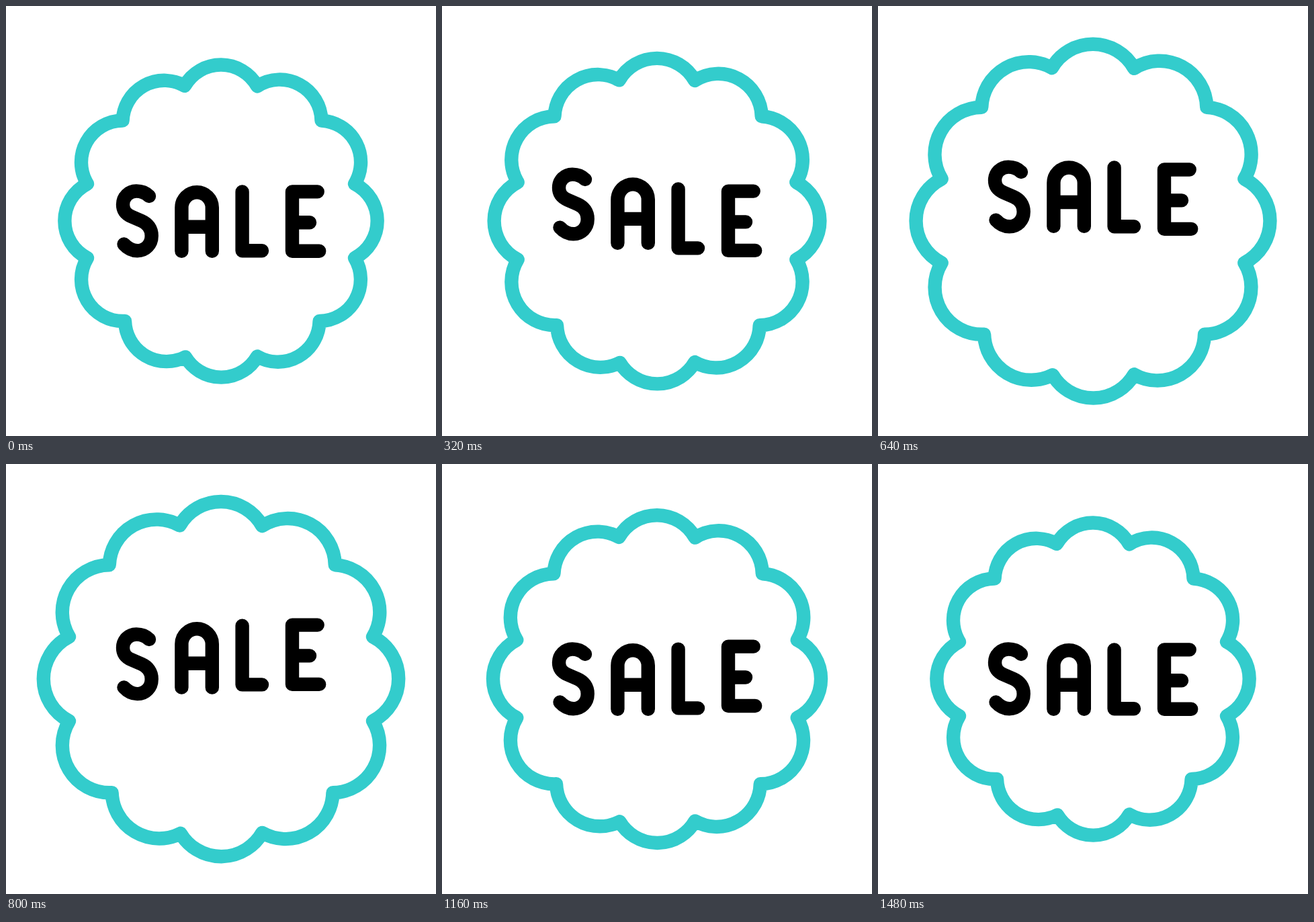
Recreate the animation shown at these times as an HTML page. Size 640 by 640 pixels, loop 1.64 s.

```html
<!DOCTYPE html>
<html lang="en">
<head>
<meta charset="utf-8">
<title>Sale badge</title>
<style>
  html, body { margin: 0; width: 100%; height: 100%; overflow: hidden; background: #fff; }
  svg { display: block; width: 100vw; height: 100vh; }
  path { fill: none; stroke-width: 20.4; stroke-linecap: round; stroke-linejoin: round; }
  #badge { stroke: #3cc; }
  #word path { stroke: #000; }
</style>
</head>
<body>
<svg viewBox="0 0 640 640" role="img" aria-label="SALE">
  <path id="badge"/>
  <g id="word">
    <path d="M213 283C209 279 203 275.5 194 275.5C183 275.5 174 284 174 295.5C174 305 179 310 187 313.5L202 320C211 324 216.7 331.5 216.7 342C216.7 355 207.5 364.2 195.5 364.2C187 364.2 181 360.5 175.5 354.5"/>
    <path d="M261.4 364.7V300A22.7 22.7 0 0 1 306.8 300V364.7M261.4 328.8H306.8"/>
    <path d="M351.6 276.5V364.3H381"/>
    <path d="M463.7 276.4H426V364.7H466.2M426 322.2H452"/>
  </g>
</svg>
<script>
  const LOOP = 1640, TICK = 40;
  const LIFT = 36.8, STAGGER = 80, GROWTH = 0.136;

  const badge = document.getElementById('badge');
  const letters = [...document.querySelectorAll('#word path')];

  // Notches between the twelve scallops, clockwise from the upper left
  const notches = [
    [266, 118.8], [374, 119.4], [469.5, 170.5], [519, 264.7], [519, 375], [466.6, 469],
    [374, 521.6], [267, 522.4], [177, 469], [121, 375], [121, 264.7], [173.6, 170.5]
  ];
  badge.setAttribute('d', 'M' + notches[0] +
    [...notches.slice(1), notches[0]].map(p => 'A62 62 0 0 1 ' + p).join('') + 'Z');

  // Symmetric ease, cubic-bezier(.62, 0, .38, 1)
  function ease(x) {
    if (x <= 0) return 0;
    if (x >= 1) return 1;
    let lo = 0, hi = 1, s = 0.5;
    for (let i = 0; i < 24; i++) {
      const r = 1 - s;
      if (1.86 * s * r * r + 1.14 * s * s * r + s * s * s < x) lo = s; else hi = s;
      s = (lo + hi) / 2;
    }
    return s * s * (3 - 2 * s);
  }

  const pulse = (t, up, down) => ease(t / up) - ease((t - up) / down);

  function draw(t) {
    const k = 1 + GROWTH * pulse(t, 760, 720);
    badge.setAttribute('transform', `translate(320 320) scale(${k}) translate(-320 -320)`);
    badge.style.strokeWidth = 20.4 / k;
    letters.forEach((el, i) => {
      const y = -LIFT * pulse(t - i * STAGGER, 560, 520);
      el.setAttribute('transform', `translate(0 ${y})`);
    });
  }

  const start = performance.now();
  function tick() {
    const t = (performance.now() - start) % LOOP;
    draw(Math.floor(t / TICK) * TICK);
    requestAnimationFrame(tick);
  }
  tick();
</script>
</body>
</html>
```
